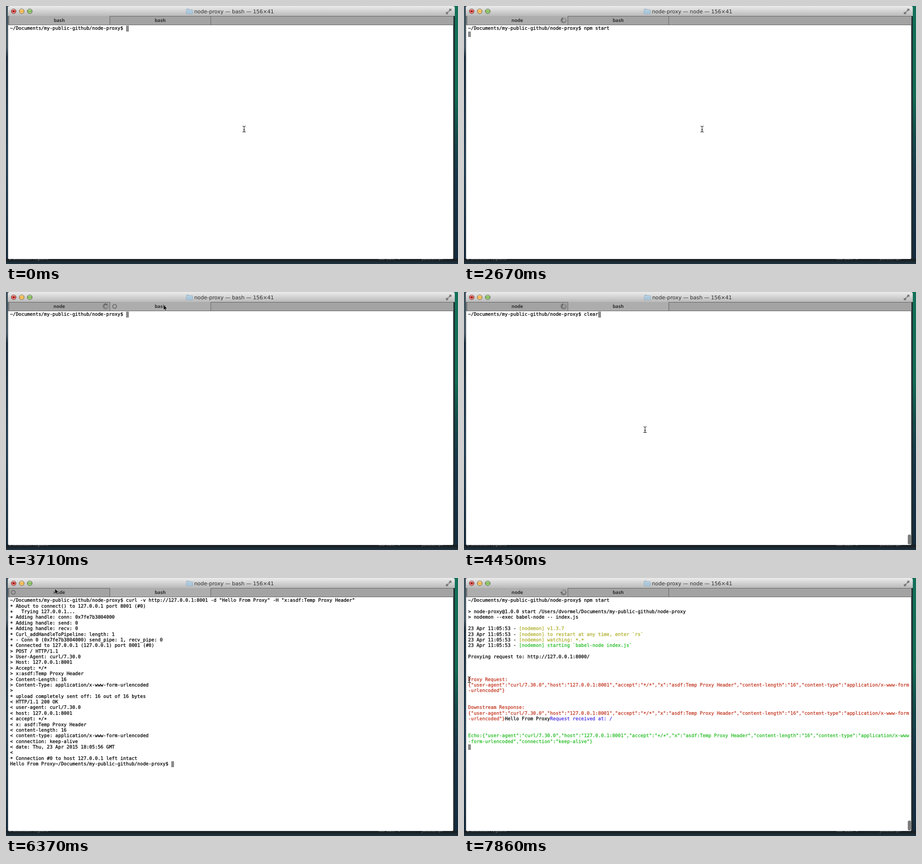
An HTML page that plays this animation: 990x566 px, repeating every 8000 ms.

```html
<!DOCTYPE html>
<html lang="en">
<head>
<meta charset="utf-8">
<title>Terminal proxy demo</title>
<style>
  html, body { margin: 0; width: 100%; height: 100%; overflow: hidden; background: #10202f; }
  #stage { position: relative; width: 990px; height: 566px; overflow: hidden; text-rendering: geometricPrecision; }
  svg { position: absolute; left: 0; top: 0; overflow: visible; }
  .title { font: 11.4px "DejaVu Sans", sans-serif; fill: #2e2e2e; text-anchor: middle; }
  .tab { font: bold 10.1px "Noto Sans", sans-serif; fill: #303030; text-anchor: middle; }
  .behind { font: 9.2px "DejaVu Sans", sans-serif; fill: #777a7c; }
  #screen {
    position: absolute; left: 9px; top: 43.3px; margin: 0; color: #000;
    font: 10.29px/12.38px "DejaVu Sans Mono", monospace; white-space: pre;
    -webkit-text-stroke: .28px;
  }
  #screen i { display: inline-block; width: 6.2px; height: 12.38px; background: #8b8b8b; vertical-align: top; }
  #screen b { font-weight: inherit; position: relative; top: 1.5px; }
  .red { color: #c23621; }
  .green { color: #25bc24; }
  .yellow { color: #adad27; }
  .blue { color: #492ee1; }
  #scrollbar { position: absolute; left: 972px; top: 532px; width: 7px; height: 22px; border-radius: 4px; background: #7d7d7d; }
</style>
</head>
<body>
<div id="stage">
  <svg width="990" height="566">
    <defs>
      <linearGradient id="leftEdge" x2="0" y2="1">
        <stop offset="0" stop-color="#3d505c"/><stop offset=".16" stop-color="#475a66"/>
        <stop offset=".2" stop-color="#1a2c3c"/><stop offset=".6" stop-color="#203e54"/><stop offset="1" stop-color="#132838"/>
      </linearGradient>
      <linearGradient id="rightEdge" x2="0" y2="1">
        <stop offset="0" stop-color="#147059"/><stop offset=".35" stop-color="#116a53"/>
        <stop offset=".5" stop-color="#144a4a"/><stop offset=".65" stop-color="#17364a"/><stop offset="1" stop-color="#142a3e"/>
      </linearGradient>
      <linearGradient id="floor" x2="0" y2="1">
        <stop offset="0" stop-color="#161b1e"/><stop offset=".5" stop-color="#1c262d"/><stop offset="1" stop-color="#203544"/>
      </linearGradient>
      <linearGradient id="bar" x2="0" y2="1">
        <stop offset="0" stop-color="#ececec"/><stop offset="1" stop-color="#b9b9b9"/>
      </linearGradient>
      <linearGradient id="gloss" x2="0" y2="1">
        <stop offset="0" stop-color="#fff" stop-opacity=".65"/><stop offset=".45" stop-color="#fff" stop-opacity=".05"/>
        <stop offset="1" stop-color="#fff" stop-opacity=".4"/>
      </linearGradient>
    </defs>
    <path fill="url(#leftEdge)" d="M0 0h6v566h-6z"/>
    <path fill="url(#rightEdge)" d="M978 0h12v566h-12z"/>
    <path fill="#202b2d" d="M979 20h4v540h-4z"/>
    <path fill="url(#floor)" d="M0 555h990v11h-990z"/>
    <g class="behind">
      <text x="6" y="557">2 selection regions</text>
      <text x="814" y="557">Tab Size: 4</text>
      <text x="911" y="557">JavaScript</text>
    </g>
    <path fill="#fff" d="M4.500 41h975v512q0 2-2 2h-971q-2 0-2-2z"/>
    <path stroke="#8d9599" d="M4.500 41v513"/>
    <path fill="url(#bar)" d="M4 22v-18q0-4 4-4h970q5 0 5 4v18z"/>
    <path fill="#a3a3a3" d="M5 22h975v19.500h-975z"/>
    <path fill="none" stroke="#626262" d="M5 22.500h975M5 41.500h975M6.500 22v19M227.500 22v19M448.500 22v19"/>
    <rect id="active" y="22" height="19" width="220" fill="#adadad"/>
    <g id="lights"></g>
    <circle cx="16.800" cy="11.500" r="1.800" fill="#6d0d0d"/>
    <g id="folder">
      <path d="M395 8q0-1.500 1.500-1.500h4l1.500 1.500h6q1 0 1 1v7.500q0 1-1 1h-12q-1 0-1-1z" fill="#a9c6da" stroke="#8eabc0" stroke-width=".7"/>
      <path d="M395.500 10h12.500" stroke="#c9dfec"/>
    </g>
    <text id="title" class="title" x="499.500" y="16"></text>
    <g fill="#747474">
      <path d="M970 6h5.500v5.500l-1.800-1.800-2.700 2.700-1.900-1.900 2.700-2.700z"/>
      <path d="M969 18h-5.500v-5.500l1.800 1.800 2.700-2.700 1.900 1.900-2.700 2.700z"/>
    </g>
    <text id="leftTab" class="tab" x="116.700" y="35"></text>
    <text class="tab" x="337.800" y="35">bash</text>
    <g id="spinner" stroke="#303030" stroke-width="1.300" stroke-linecap="round"></g>
    <circle id="close" cy="31.500" r="4.200" fill="none" stroke="#707070" stroke-width="2"/>
  </svg>
  <pre id="screen"></pre>
  <div id="scrollbar"></div>
  <svg id="pointer" width="1" height="1">
    <path id="beam" transform="translate(.5)" fill="none" stroke="#111" stroke-width="1.100" d="M-3.500-6.500q3 0 3.500 1.500q.5-1.500 3.500-1.500M-3.500 6.500q3 0 3.500-1.500q.5 1.500 3.500 1.500M0-5v10M-1.800 1.500h3.600"/>
    <path id="arrow" fill="#111" stroke="#eee" stroke-width=".7" d="M0 0v12l2.800-2.600 2 4.500 2-.9-2-4.300h3.800z"/>
  </svg>
</div>
<script>
const LOOP = 8000, TICK = 148;
const COLUMNS = 156;
const $ = id => document.getElementById(id);
// Asterisks sit on the middle of the line
const escape = s => s.replace(/&/g, '&amp;').replace(/</g, '&lt;').replace(/>/g, '&gt;').replace(/\*/g, '<b>*</b>');
const paint = (color, s) => `<span class="${color}">${escape(s)}</span>`;
const wrap = s => s.replace(new RegExp(`(.{${COLUMNS}})`, 'g'), '$1\n');
const withCursor = html => html + '<i></i>';

const path = '~/Documents/my-public-github/node-proxy$ ';
const prompt = typed => withCursor(path + escape(typed));

const npmLines = path + 'npm start\n\n' + escape(
  '> node-proxy@1.0.0 start /Users/dvormel/Documents/my-public-github/node-proxy\n' +
  '> nodemon --exec babel-node -- index.js\n\n');
const log = (color, s) => '23 Apr 11:05:53 - ' + paint(color, '[nodemon] ' + s) + '\n';
const started = npmLines + log('yellow', 'v1.3.7') + log('yellow', 'to restart at any time, enter `rs`') +
  log('yellow', 'watching: *.*') + log('green', 'starting `babel-node index.js`');

const headers = '{"user-agent":"curl/7.30.0","host":"127.0.0.1:8001","accept":"*/*","x":"asdf:Temp Proxy Header",' +
  '"content-length":"16","content-type":"application/x-www-form-urlencoded"';
const proxied = started + '\nProxying request to: http://127.0.0.1:8000/\n\n\n\n' +
  paint('red', 'Proxy Request:\n' + wrap(headers + '}')) + '\n\n\n' +
  paint('red', 'Downstream Response:\n' + wrap(headers + '}')) +
  'Hello From Proxy' + paint('blue', 'Request received at: /') + '\n\n\n' +
  paint('green', wrap('Echo:' + headers + ',"connection":"keep-alive"}')) + '\n';

const curl = 'curl -v http://127.0.0.1:8001 -d "Hello From Proxy" -H "x:asdf:Temp Proxy Header"';
const response = path + escape(`${curl}
* About to connect() to 127.0.0.1 port 8001 (#0)
*   Trying 127.0.0.1...
* Adding handle: conn: 0x7fe7b3804000
* Adding handle: send: 0
* Adding handle: recv: 0
* Curl_addHandleToPipeline: length: 1
* - Conn 0 (0x7fe7b3804000) send_pipe: 1, recv_pipe: 0
* Connected to 127.0.0.1 (127.0.0.1) port 8001 (#0)
> POST / HTTP/1.1
> User-Agent: curl/7.30.0
> Host: 127.0.0.1:8001
> Accept: */*
> x:asdf:Temp Proxy Header
> Content-Length: 16
> Content-Type: application/x-www-form-urlencoded
>
* upload completely sent off: 16 out of 16 bytes
< HTTP/1.1 200 OK
< user-agent: curl/7.30.0
< host: 127.0.0.1:8001
< accept: */*
< x: asdf:Temp Proxy Header
< content-length: 16
< content-type: application/x-www-form-urlencoded
< connection: keep-alive
< date: Thu, 23 Apr 2015 18:05:56 GMT
<
* Connection #0 to host 127.0.0.1 left intact
Hello From Proxy`) + path;

const screens = [
  [0, prompt('')],
  [890, prompt('n')], [1190, prompt('np')], [1340, prompt('npm')], [1490, prompt('npm ')],
  [1630, prompt('npm s')], [1780, prompt('npm sta')], [1920, prompt('npm star')], [2220, prompt('npm start')],
  [2520, withCursor(path + 'npm start\n')],
  [2820, withCursor(npmLines)],
  [2970, withCursor(started)],
  [3710, prompt('')], [4300, prompt('clear')], [4750, prompt(curl)],
  [5190, withCursor(response)],
  [6520, withCursor(proxied)]
];

// Pointer stops: time, x, y
const route = [
  [0, 521, 270], [2670, 521, 270], [2970, 420, 110], [3120, 378, 52], [3270, 350, 31], [3560, 345, 28],
  [3710, 345, 28], [3860, 352, 70], [4150, 396, 302], [5490, 396, 302], [5930, 140, 50], [6080, 112, 29],
  [6230, 107, 23], [6820, 107, 23], [6970, 95, 100], [7120, 60, 225], [7270, 40, 267], [7560, 16, 240],
  [7860, 11, 223], [LOOP, 11, 223]
];

const lastBefore = (list, t) => list.filter(entry => entry[0] <= t).pop();

function pointerAt(t) {
  const next = Math.max(1, route.findIndex(stop => stop[0] > t));
  const [t0, x0, y0] = route[next - 1], [t1, x1, y1] = route[next];
  const k = (t - t0) / (t1 - t0);
  return [x0 + (x1 - x0) * k, y0 + (y1 - y0) * k];
}

const show = (id, visible) => { $(id).style.visibility = visible ? 'visible' : 'hidden'; };

$('lights').innerHTML = ['#e0443e', '#f2b13c', '#78b84a'].map((color, i) => {
  const disc = fill => `<circle cx="${16.8 + 17.6 * i}" cy="11.5" r="5.3" fill="${fill}" stroke="#0006" stroke-width=".8"/>`;
  return disc(color) + disc('url(#gloss)');
}).join('');
$('spinner').innerHTML = Array.from({ length: 12 }, (_, i) =>
  `<path d="M0-3.600v-2.800" transform="rotate(${30 * i})" opacity="${0.2 + 0.8 * i / 11}"/>`).join('');

let shown;
function render(t) {
  const html = lastBefore(screens, t)[1];
  if (html !== shown) $('screen').innerHTML = shown = html;

  const running = t >= 2520;
  const rightActive = t >= 3710 && t < 6520;
  $('title').textContent = `node-proxy — ${running && !rightActive ? 'node' : 'bash'} — 156×41`;
  $('folder').setAttribute('transform', `translate(${running && !rightActive ? -0.8 : 0})`);
  $('leftTab').textContent = running ? 'node' : 'bash';
  $('active').setAttribute('x', rightActive ? 228 : 7);

  const tick = Math.floor(t / TICK + 0.02);
  const [x, y] = pointerAt(Math.min(t, tick * TICK + TICK * 0.08));
  const onTabs = y < 41;
  $('pointer').style.transform = `translate(${Math.round(x)}px, ${Math.round(y)}px)`;
  show('beam', !onTabs);
  show('arrow', onTabs);
  show('close', onTabs);
  $('close').setAttribute('cx', x < 228 ? 16 : 238);

  show('spinner', running && !(onTabs && x < 228));
  $('spinner').setAttribute('transform', `translate(218.500 31.500) rotate(${tick * 60})`);
  show('scrollbar', (t >= 4000 && t < 4750) || t >= 6820);
  $('scrollbar').style.opacity = t >= 4600 && t < 4750 ? 0.5 : 1;
}

let start;
function frame(now) {
  start ??= now;
  render((now - start) % LOOP);
  requestAnimationFrame(frame);
}
render(0);
requestAnimationFrame(frame);
</script>
</body>
</html>
```
